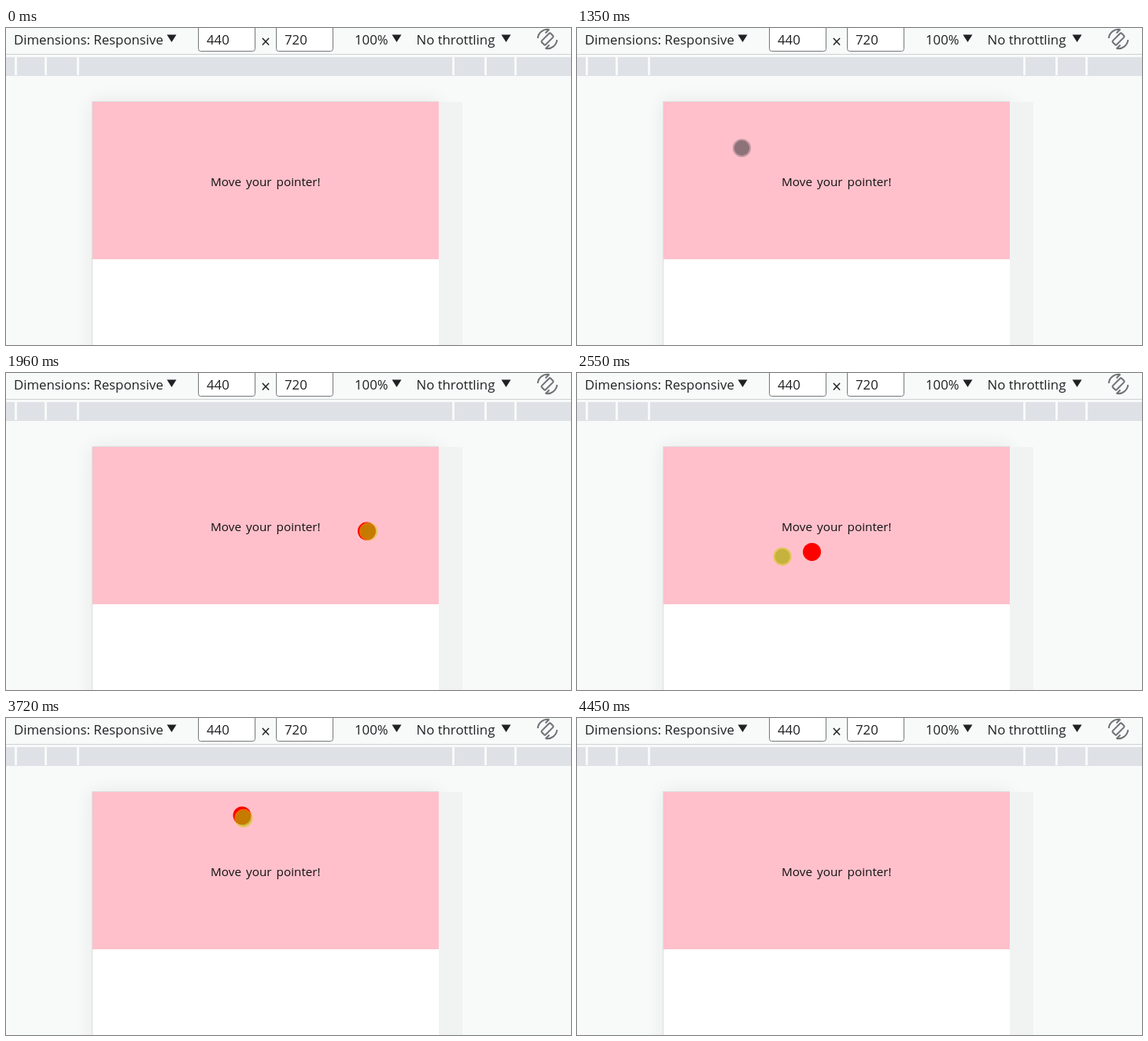
These frames come from a looping animation (718 by 403 pixels, 4.92 s). An HTML page:

```html
<!DOCTYPE html>
<html lang="en">
<head>
<meta charset="utf-8">
<title>Move your pointer</title>
<style>
  html, body { margin: 0; width: 100%; height: 100%; overflow: hidden; background: #f8faf9; }
  svg { display: block; width: 718px; height: 403px; }
  text { font-family: "Open Sans", "Noto Sans", sans-serif; font-size: 16.8px; fill: #202124; }
  .hint { font-size: 15.3px; word-spacing: 2px; fill: #111; }
  .field { fill: #fff; stroke: #75787b; }
  .icon { fill: none; stroke: #6e7377; stroke-width: 2; }
  .hover .core { fill: rgba(50, 50, 55, .55); }
  .hover .rim { stroke: rgba(80, 80, 80, .35); }
  .press .core { fill: rgba(172, 174, 0, .7); }
  .press .rim { stroke: rgba(210, 200, 0, .55); }
</style>
</head>
<body>
<svg viewBox="0 0 718 403">
  <defs>
    <filter id="soft" x="-20%" y="-20%" width="140%" height="140%"><feGaussianBlur stdDeviation="12"/></filter>
    <clipPath id="frame"><rect y="61" width="580" height="342"/></clipPath>
    <path id="caret" d="M0 0h12l-6 9.500z" fill="#202124"/>
    <path id="turn" d="M-2 -12A12.200 12.200 0 0 1 12.200 -1M-2.500 -12.500L2.500 -7.500"/>
  </defs>

  <!-- toolbar -->
  <text x="10" y="21">Dimensions: Responsive</text>
  <rect class="field" x="244.5" y="-6.5" width="72" height="36" rx="3"/>
  <rect class="field" x="343.5" y="-6.5" width="72" height="36" rx="3"/>
  <text x="255" y="21">440</text>
  <text x="354" y="21">720</text>
  <text x="330" y="24.5" text-anchor="middle" style="font-size:21px">×</text>
  <text x="443" y="21">100%</text>
  <text x="521.5" y="21">No throttling</text>
  <use href="#caret" x="204.500" y="8.500"/>
  <use href="#caret" x="490.500" y="8.500"/>
  <use href="#caret" x="629.500" y="8.500"/>
  <g class="icon" transform="translate(688 14) scale(-1 1)">
    <rect x="-3.500" y="-8" width="7" height="16" rx="1.500" transform="rotate(-45)"/>
    <use href="#turn"/>
    <use href="#turn" transform="rotate(180)"/>
  </g>
  <rect y="33" width="718" height="1" fill="#cfd2d5"/>

  <!-- ruler -->
  <rect y="37" width="718" height="24" fill="#dee1e6"/>
  <path d="M12.500 37v23M50.500 37v23M91.500 37v23M568.500 37v23M609.500 37v23M647.500 37v23" stroke="#f8faf9" stroke-width="3"/>

  <!-- page -->
  <g clip-path="url(#frame)">
    <rect x="109" y="93" width="441" height="400" opacity=".07" filter="url(#soft)"/>
  </g>
  <rect x="550" y="94" width="30" height="309" fill="#f1f3f2"/>
  <rect x="109" y="93" width="441" height="310" fill="#dcdfde"/>
  <rect x="110" y="94" width="440" height="309" fill="#fff"/>
  <rect x="110" y="94" width="440" height="200" fill="#ffc0cb"/>
  <text class="hint" x="260" y="201">Move your pointer!</text>

  <circle id="dot" r="11.500" fill="#f00"/>
  <g id="touch">
    <circle class="core" r="9.700"/>
    <circle class="rim" r="10.600" fill="none" stroke-width="2"/>
  </g>
  <path id="arrow" d="M.5 .5V16.500L4 13L6.500 18.500L9 17.500L6.500 12H11.500Z" fill="#fff" stroke="#000"/>
</svg>
<script>
  const LOOP = 4920, STEP = 67, LAG = 50, EDGE = 550;
  const START = 60, DOWN = 1420, UP = 3780, END = 4400;

  // stops of the hand: time, x, y
  const stops = [
    [0, 530, 358], [560, 193, 165], [670, 191.5, 157.5], [1150, 225, 154],
    [1340, 209.5, 152.5], [DOWN, 209.5, 152.5], [1920, 460.5, 201.5], [2210, 464, 201.5],
    [2700, 199, 243], [2720, 199, 243], [3050, 484, 243], [3270, 484, 243],
    [3635, 300, 124], [3790, 308, 138], [4080, 378, 246], [4380, 614, 377]
  ];

  const $ = id => document.getElementById(id);
  const dot = $("dot"), touch = $("touch"), arrow = $("arrow");
  const ease = k => k * k * (3 - 2 * k);

  function at(t) {
    const i = stops.findIndex(s => s[0] > t);
    if (i < 0) return stops[stops.length - 1].slice(1);
    const [t0, x0, y0] = stops[i - 1], [t1, x1, y1] = stops[i];
    const k = ease((t - t0) / (t1 - t0));
    return [x0 + (x1 - x0) * k, y0 + (y1 - y0) * k];
  }

  function place(el, on, [x, y]) {
    el.style.display = on ? "" : "none";
    el.setAttribute("transform", `translate(${x} ${y})`);
  }

  function draw(now) {
    const t = Math.floor(now % LOOP / STEP) * STEP;
    const pos = at(t);
    const shown = t >= START && t < END;
    const held = t >= DOWN && t < UP;
    const inside = pos[0] < EDGE;
    touch.setAttribute("class", held ? "press" : "hover");
    place(touch, shown && inside, pos);
    place(arrow, shown && !inside, pos);
    place(dot, held, at(Math.max(DOWN, t - LAG)));
  }

  const begin = performance.now();
  function frame() {
    draw(performance.now() - begin);
    requestAnimationFrame(frame);
  }
  frame();
</script>
</body>
</html>
```
